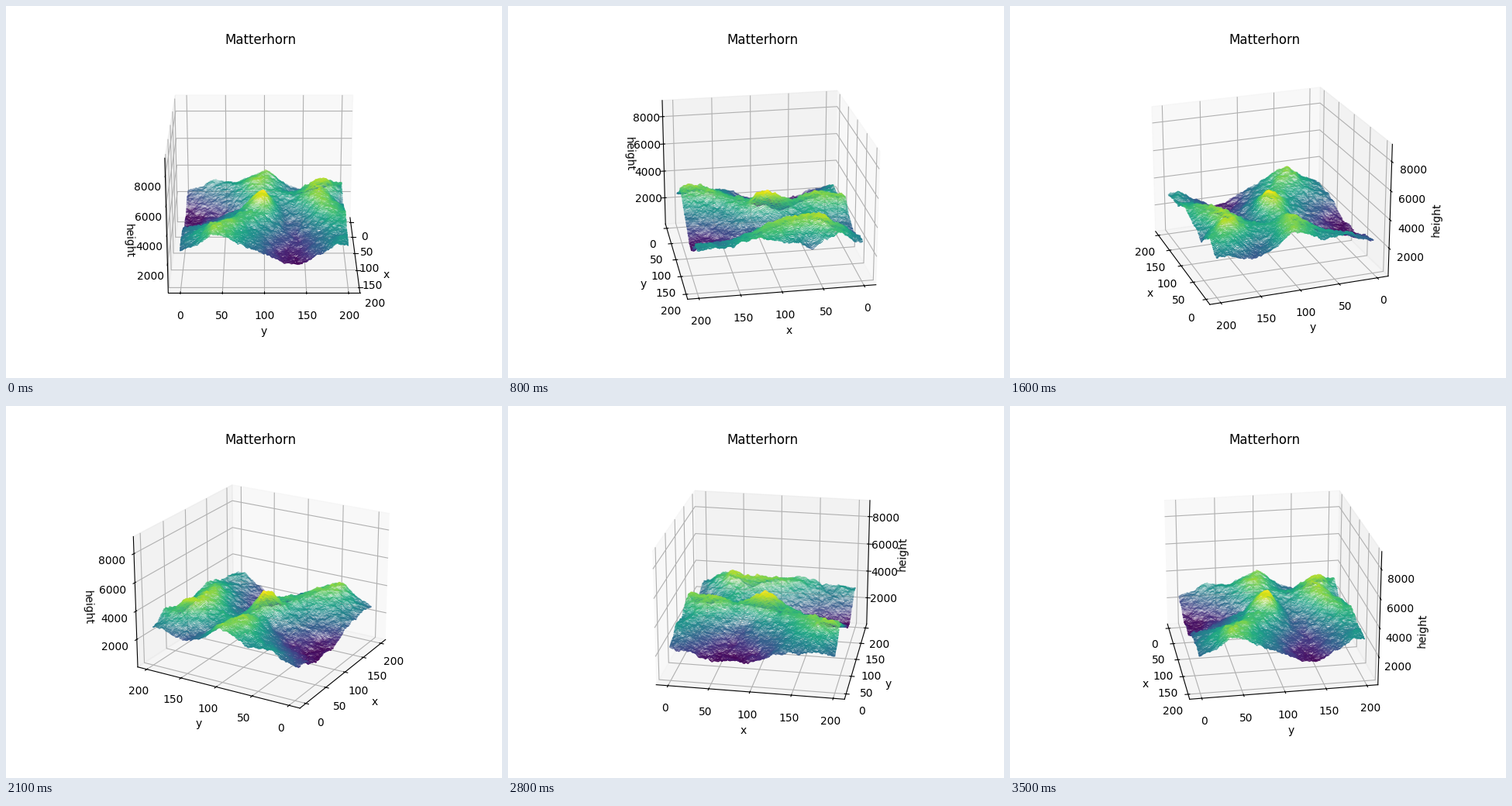
A matplotlib script that plays this animation: 640 px wide and 480 px high, repeating every 3.6 s.

```python
import numpy as np
import matplotlib.pyplot as plt
from matplotlib.animation import FuncAnimation

N = 200
FRAMES = 36

# Key points as x, y, metres
RIDGES = [
    [(0, 106, 3750), (37, 88, 3950), (64, 93, 3420), (99, 99, 4480),
     (120, 86, 3480), (190, 42, 3960)],
    [(25, 199, 3480), (43, 167, 4130), (109, 171, 3740), (136, 199, 3500)],
]
VALLEYS = [
    [(52, 0, 1660), (58, 36, 1920), (78, 70, 2430)],
    [(199, 140, 1700), (150, 130, 2050), (72, 122, 2850)],
    [(0, 160, 2450), (25, 132, 2750)],
]
SPOTS = [
    (0, 0, 2500), (0, 199, 2870), (199, 0, 2700), (199, 199, 3080),
    (0, 30, 3250), (0, 65, 2900), (62, 199, 2420), (140, 0, 2550),
    (199, 75, 2850), (199, 187, 3150), (155, 98, 2800), (125, 48, 2850),
]


def sample_line(points, per_segment=6):
    last = len(points) - 1
    t = np.linspace(0, last, per_segment * last + 1)
    return np.column_stack([np.interp(t, range(last + 1), col)
                            for col in zip(*points)])


def fractal_noise(power=1.8, cutoff=0.02):
    rng = np.random.default_rng(7)
    f = np.fft.fftfreq(N)
    k = np.hypot(f[:, None], f)
    spec = np.fft.fft2(rng.standard_normal((N, N))) / (k + cutoff) ** power
    spec[0, 0] = 0
    noise = np.fft.ifft2(spec).real
    return noise / noise.std()


def distances(x, y, kx, ky):
    return np.hypot(np.subtract.outer(x, kx), np.subtract.outer(y, ky))


def terrain():
    # Cone-shaped radial basis: sharp crests through the key points
    kx, ky, kh = np.vstack([SPOTS] + [sample_line(p) for p in RIDGES + VALLEYS]).T
    base = kh.mean()
    weights = np.linalg.solve(distances(kx, ky, kx, ky), kh - base)
    x, y = (g.ravel() for g in np.mgrid[:N, :N])
    h = base + distances(x, y, kx, ky) @ weights
    return x, y, h + 100 * fractal_noise().ravel()


x, y, height = terrain()

fig = plt.figure(figsize=(6.4, 4.8), dpi=100)
ax = fig.add_subplot(projection="3d")
ax.scatter(x, y, height, c=height, cmap="viridis", vmin=1600, vmax=4500,
           s=0.9, marker="s", linewidths=0, snap=False)
ax.set(title="Matterhorn", xlabel="x", ylabel="y", zlabel="height",
       xlim=(-14.5, 213.5), ylim=(-14.5, 213.5), zlim=(8, 9168),
       xticks=range(0, 201, 50), yticks=range(0, 201, 50),
       zticks=range(2000, 8001, 2000))


def update(i):
    ax.view_init(elev=22, azim=360 / FRAMES * i)
    return []


anim = FuncAnimation(fig, update, frames=FRAMES, interval=100,
                     repeat=True, repeat_delay=0)
plt.show()
```
